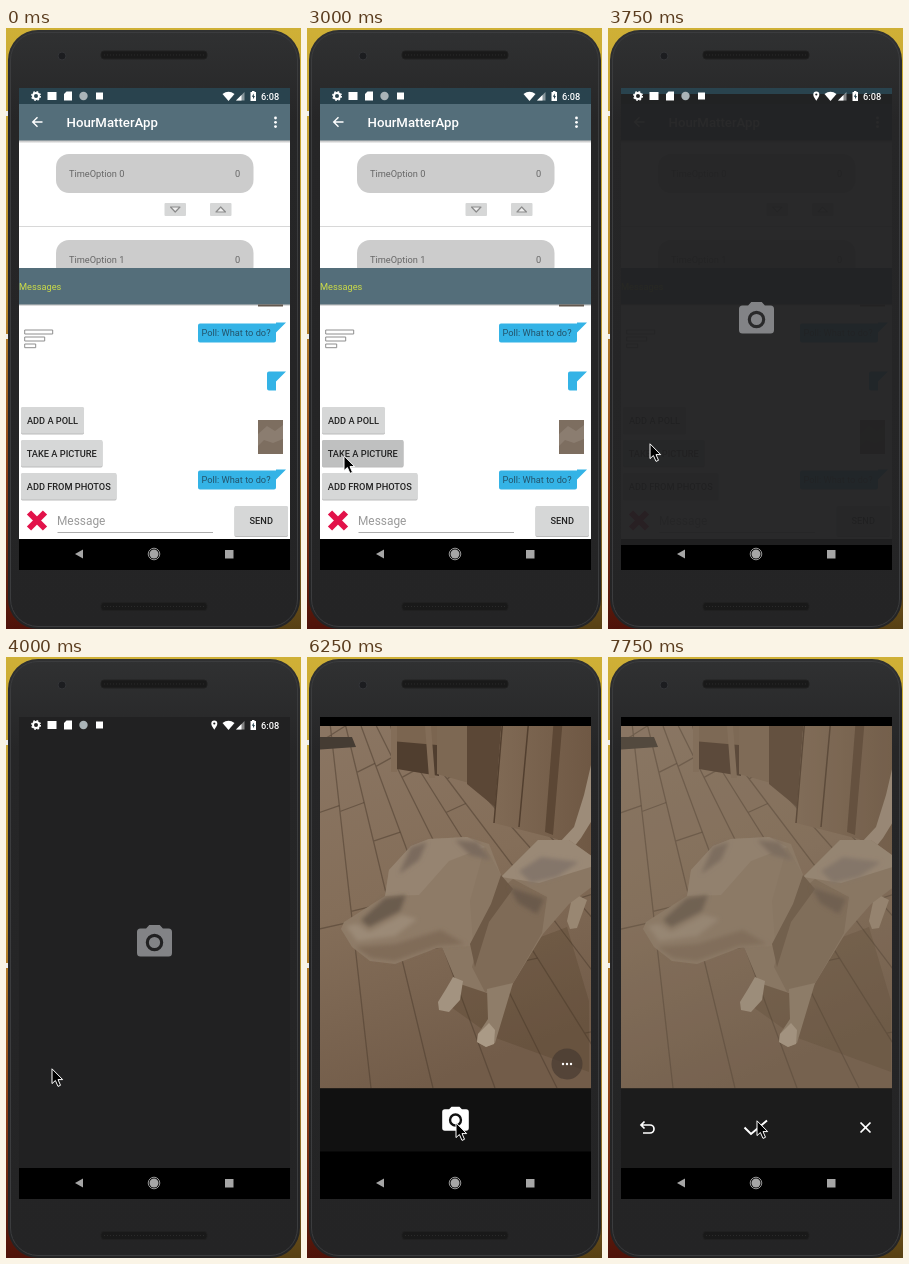
An HTML page that plays this animation: 295 by 601 pixels, repeating every 8 s.

```html
<!DOCTYPE html>
<html lang="en">
<head>
<meta charset="utf-8">
<title>Phone messages</title>
<style>
html, body { margin: 0; width: 100%; height: 100%; overflow: hidden; background: #c9a92f; }
svg { display: block; width: 295px; height: 601px; }
text { font: 9.24px Roboto, "Open Sans", sans-serif; fill: #666; }
.med { font-weight: 500; fill: #222; }
.poll { fill: #23536a; }
</style>
</head>
<body>
<svg viewBox="0 0 295 601">
<defs>
  <linearGradient id="desk" x2="0" y2="1">
    <stop offset="0" stop-color="#cfb036"/><stop offset=".45" stop-color="#b98a2c"/>
    <stop offset=".75" stop-color="#8a3c16"/><stop offset="1" stop-color="#4e1209"/>
  </linearGradient>
  <linearGradient id="deskRight" x2="0" y2="1">
    <stop offset="0" stop-color="#cfb036"/><stop offset=".7" stop-color="#b08a30"/><stop offset="1" stop-color="#574014"/>
  </linearGradient>
  <linearGradient id="body" x2="0" y2="1">
    <stop offset="0" stop-color="#303132"/><stop offset=".15" stop-color="#262627"/><stop offset="1" stop-color="#242425"/>
  </linearGradient>
  <linearGradient id="floor" x2=".3" y2="1">
    <stop offset="0" stop-color="#8b7663"/><stop offset=".5" stop-color="#846e59"/><stop offset="1" stop-color="#725c49"/>
  </linearGradient>
  <linearGradient id="door">
    <stop offset="0" stop-color="#806a55"/><stop offset="1" stop-color="#6d5642"/>
  </linearGradient>
  <linearGradient id="shade" x2="0" y2="1">
    <stop offset="0" stop-color="#000" stop-opacity=".28"/><stop offset="1" stop-color="#000" stop-opacity="0"/>
  </linearGradient>
  <filter id="soft"><feGaussianBlur stdDeviation=".7"/></filter>
  <filter id="softer"><feGaussianBlur stdDeviation="2.2"/></filter>
  <clipPath id="screen"><rect x="13" y="60" width="271" height="482"/></clipPath>
  <clipPath id="list"><rect x="13" y="112" width="271" height="128"/></clipPath>
  <clipPath id="frame"><rect x="13" y="69" width="271" height="362.500"/></clipPath>
  <path id="bubble" d="M2 1H78V0H88L78 10V18q0 2-2 2H2q-2 0-2-2V3q0-2 2-2z" fill="#34b3e6"/>
  <path id="cam" fill-rule="evenodd" d="M-3-10L-4.800-8H-8q-2 0-2 2V6q0 2 2 2H8q2 0 2-2V-6q0-2-2-2H4.800L3-10zM0-5a5 5 0 0 1 0 10a5 5 0 0 1 0-10zM0-3.200a3.200 3.200 0 0 0 0 6.400a3.200 3.200 0 0 0 0-6.400z"/>
</defs>

<rect width="295" height="601" fill="url(#desk)"/>
<rect x="150" width="145" height="601" fill="url(#deskRight)"/>
<path d="M0 83h2v5h-2zM0 306h2v5h-2z" fill="#eee"/>
<rect x="2" y="2" width="292" height="599" rx="30" fill="url(#body)"/>
<rect x="4.500" y="4.500" width="287" height="594" rx="27.500" fill="none" stroke="#3b3c3e"/>
<circle cx="56" cy="28" r="4" fill="#1c1d20" stroke="#333437"/>
<g fill="#191919" stroke="#202020">
  <rect x="95" y="23" width="106" height="8" rx="3"/>
  <rect x="95" y="574.500" width="106" height="8" rx="3"/>
</g>
<g stroke="#2b2b2b" stroke-dasharray="1 2"><path d="M98 27H199M98 578.500H199"/></g>

<g clip-path="url(#screen)">
  <rect x="13" y="60" width="271" height="482"/>

  <g id="chat">
    <rect x="13" y="60" width="271" height="451" fill="#fff"/>
    <rect x="13" y="60" width="271" height="16" fill="#29434e"/>
    <rect x="13" y="76" width="271" height="36.500" fill="#546e7a"/>
    <rect x="13" y="112.500" width="271" height="3" fill="url(#shade)"/>
    <path d="M36.500 94H27M31.500 89.200L26.700 94L31.500 98.800" fill="none" stroke="#fff" stroke-width="1.400"/>
    <text x="60.500" y="99" class="med" style="font-size:13.2px;fill:#fff">HourMatterApp</text>
    <g fill="#fff"><circle cx="269.500" cy="90" r="1.400"/><circle cx="269.500" cy="94.300" r="1.400"/><circle cx="269.500" cy="98.600" r="1.400"/></g>

    <g clip-path="url(#list)">
      <g fill="#ccc"><rect x="50" y="126" width="197.500" height="39" rx="13"/><rect x="50" y="212" width="197.500" height="39" rx="13"/></g>
      <text x="63" y="149">TimeOption 0</text><text x="229" y="149">0</text>
      <text x="63" y="235">TimeOption 1</text><text x="229" y="235">0</text>
      <path d="M13 198.500H284" stroke="#d8d8d8"/>
      <g fill="#d6d7d7"><rect x="158.500" y="175" width="21.500" height="13" rx="1"/><rect x="204" y="175" width="21.500" height="13" rx="1"/></g>
      <path d="M164.500 179H174L169.200 184zM210 184H219.500L214.700 179z" fill="#eee" stroke="#8b8b8b" stroke-width="1.200" stroke-linejoin="round"/>
    </g>

    <rect x="13" y="240" width="271" height="36.500" fill="#546e7a"/>
    <rect x="13" y="276.500" width="271" height="2" fill="url(#shade)"/>
    <text x="13" y="262" style="fill:#cbdb48">Messages</text>
    <rect x="252" y="276.500" width="25" height="2" fill="#62584f"/>
    <path d="M18.700 302h28v4h-28zM18.700 309h20v4h-20zM18.700 316h11v3.700h-11z" fill="#fff" stroke="#8e8e8e"/>

    <use href="#bubble" x="192" y="294.500"/><text x="195.500" y="308" class="poll">Poll: What to do?</text>
    <path d="M262 343.500H280L270 353.500V362.500H263q-2 0-2-2V345.500q0-2 2-2z" fill="#34b3e6"/>
    <rect x="252" y="392" width="25" height="34" fill="#7d6e60"/>
    <path d="M252 406l9-8l8 5l8-6v14l-10 4l-9-3l-6 6z" fill="#8b7d70"/>
    <use href="#bubble" x="192" y="441.500"/><text x="195.500" y="455" class="poll">Poll: What to do?</text>

    <g id="buttons"></g>
    <path d="M23 484.500L39 500.500M39 484.500L23 500.500" stroke="#e2124a" stroke-width="6"/>
    <text x="51" y="497" style="font-size:11.88px;fill:#999">Message</text>
    <path d="M51.500 504.500H207" stroke="#999" stroke-width=".8"/>
  </g>

  <g id="splash">
    <rect id="veil" x="13" y="60" width="271" height="451" fill="#212122"/>
    <use href="#cam" transform="translate(148.500 285.500) scale(1.75)" fill="#828386"/>
  </g>

  <g id="camera">
    <rect x="13" y="60" width="271" height="451"/>
    <g clip-path="url(#frame)"><g id="photo">
      <rect x="5" y="60" width="290" height="380" fill="url(#floor)"/>
      <g filter="url(#soft)">
        <g id="planks" fill="none" stroke="#4b3b2d" stroke-opacity=".5" stroke-width="1.300"></g>
        <path d="M5 80L45 80L49 90L5 93z" fill="#453c33"/>
        <path d="M82 60H132V119L90 112z" fill="#503e2f"/>
        <path d="M84 60H130V88L84 84z" fill="#7b6550"/>
        <path d="M84 69h6v46h-6zM118 69h6l4 52h-6z" fill="#836d58"/>
        <path d="M130 60H162V126L130 117z" fill="#7d6853"/>
        <path d="M160 60H195L188 150L160 127z" fill="#5b4736"/>
        <path d="M195 60H295V215L250 182L187 166z" fill="url(#door)"/>
        <path d="M196 60L187 166M222 60L212 170" stroke="#523f2f" stroke-width="1.500" fill="none"/>
        <path d="M247 60h9l-10 118-8-3z" fill="#5c4735"/>
        <path d="M137 345L186 380L282 415V344L260 270L180 300z" fill="#46321f" opacity=".22"/>
      </g>
      <g id="dog" filter="url(#soft)"></g>
      <g id="marks" filter="url(#softer)"></g>
    </g></g>
    <rect id="wash" x="13" y="69" width="271" height="362.500" fill="#857567" opacity=".22"/>
    <g id="more">
      <circle cx="260" cy="407" r="15.500" fill="#43372f" opacity=".65"/>
      <g fill="#fff"><circle cx="256" cy="407" r="1.200"/><circle cx="260" cy="407" r="1.200"/><circle cx="264" cy="407" r="1.200"/></g>
    </g>
    <rect id="bar" x="13" y="431.500" width="271" height="63" fill="#111"/>
    <use id="shutter" href="#cam" transform="translate(148.500 463) scale(1.33)" fill="#fff"/>
    <g id="review" fill="none" stroke="#fff" stroke-width="1.700">
      <path d="M36.500 464.500L33 468L36.500 471.500M33 468H42a4 4 0 0 1 0 8H35"/>
      <path d="M136.500 470.500L143 477L159 463.500" stroke-width="2"/>
      <path d="M252.500 465.500L262.500 475.500M262.500 465.500L252.500 475.500"/>
    </g>
  </g>

  <g id="status" fill="#fff">
    <circle cx="30" cy="68" r="3" fill="none" stroke="#fff" stroke-width="2"/>
    <circle cx="30" cy="68" r="4.300" fill="none" stroke="#fff" stroke-width="1.400" stroke-dasharray="1.700 1.680"/>
    <rect x="41.500" y="64" width="9" height="8"/>
    <path d="M60.500 63.500H66V72.500H58V66z"/>
    <circle cx="77.500" cy="68" r="4.200" fill="#aab4b8"/>
    <rect x="90" y="64.500" width="7" height="7"/>
    <path id="pin" d="M208.300 72.700C206 69.500 205.300 68.200 205.300 66.500a3 3 0 0 1 6 0C211.300 68.200 210.600 69.500 208.300 72.700zM208.300 65.400a1.100 1.100 0 0 0 0 2.200a1.100 1.100 0 0 0 0-2.200z"/>
    <path d="M216.500 66Q222.500 61.500 228.500 66L222.500 73z"/>
    <path d="M230 72.500L238.500 64V72.500z" opacity=".45"/><path d="M230 72.500L235.500 67V72.500z"/>
    <path d="M246 63h2.500v1h1.500v9h-5.500v-9h1.500z"/><path d="M247.800 65.500l-2 3.200h1.200v2.600l2-3.300h-1.200z" fill="#29434e"/>
    <text x="255" y="71.500" class="med" style="fill:#fff">6:08</text>
  </g>

  <g fill="#a6a6a6">
    <path d="M69 526L77 521.500V530.500z"/>
    <circle cx="148" cy="526" r="4.500"/><circle cx="148" cy="526" r="5.800" fill="none" stroke="#a6a6a6" stroke-width=".9"/>
    <rect x="219" y="522" width="8.500" height="8.500"/>
  </g>
</g>
<path id="cursor" d="M0 .8V15.600L3.400 12.500L6 18.400L8.500 17.300L6 11.600H10.700z" fill="#000" stroke="#fff" stroke-width="1"/>
</svg>

<script>
const LOOP = 8000;
const $ = id => document.getElementById(id);
const add = (parent, tag, attrs, text = '') => {
  const el = document.createElementNS('http://www.w3.org/2000/svg', tag);
  for (const k in attrs) el.setAttribute(k, attrs[k]);
  el.textContent = text;
  parent.append(el);
  return el;
};

const button = (x, y, w, h, label) => {
  add($('buttons'), 'rect', { x, y: y + 1, width: w, height: h, rx: 1.4, fill: '#bbb' });
  const face = add($('buttons'), 'rect', { x, y, width: w, height: h, rx: 1.4, fill: '#d6d7d7' });
  add($('buttons'), 'text', { x: x + w / 2, y: y + h / 2 + 3.3, class: 'med', 'text-anchor': 'middle' }, label);
  return face;
};
button(15, 379, 63, 26.5, 'ADD A POLL');
const take = button(15, 412, 81.5, 26.5, 'TAKE A PICTURE');
button(15, 445, 95.5, 26.5, 'ADD FROM PHOTOS');
button(228.5, 478, 53.5, 30, 'SEND');

// Floorboards fan out from one vanishing point
let seed = 7;
const rand = () => (seed = seed * 16807 % 2147483647) / 2147483647;
const seam = (i, y) => 10 + (i * 62 - 70) * (y + 50) / 481;
for (let i = -2; i < 13; i++) {
  let d = `M${seam(i, 69)} 69L${seam(i, 431)} 431`;
  for (let y = 75 + rand() * 50; y < 431; y += 40 + y * (.2 + .4 * rand()))
    d += `M${seam(i, y)} ${y}L${seam(i + 1, y - 9)} ${y - 9}`;
  add($('planks'), 'path', { d });
}

const facets = [
  ['#9d8c79', 'M252 186L267 170L277 138L284 108L290 100V155L274 181L262 196z'],
  ['#998772', 'M266 236L260 264L263 272L270 271L280 243z'],
  ['#8a7763', 'M194 220L231 183L262 183L290 203V226L262 247L236 277L205 328L180 336L150 326L134 288z'],
  ['#9a8976', 'M194 220L231 183L262 183L290 203V208L232 226z'],
  ['#7f6b57', 'M184 240L206 222L240 240L235 276L205 328L178 335L165 310z'],
  ['#8f7d69', 'M180 332L206 326L188 386L179 390L170 385L171 377L181 362z'],
  ['#aa9a86', 'M171 377L182 366L188 373L187 387L179 390L170 385z'],
  ['#a39380', 'M146 320L156 324L153 343L142 355L132 353L131 345L139 332z'],
  ['#8e7b67', 'M34 272L37 265L78 239L82 213L104 189L122 182L160 180L182 187L194 218L185 250L165 289L130 291L88 307L63 304L45 290z'],
  ['#968471', 'M82 213L104 189L122 182L160 180L178 190L142 204L112 238L78 239z'],
  ['#8a7763', 'M178 190L194 218L187 246L166 285L163 244z'],
  ['#6d5946', 'M194 218L206 232L182 265L168 310L163 287L184 247z']
];
const marks = [
  ['#7a6b5d', 'M104 190L120 185L112 203L92 217zM148 183L170 185L184 203L163 198z'],
  ['#6b5c4e', 'M54 263L78 241L99 238L93 254L62 270z'],
  ['#9b8a77', 'M39 269L50 267L62 275L95 258L110 262L88 279L50 284z'],
  ['#806c59', 'M48 290L88 287L134 273L158 287L130 289L88 304L64 301z'],
  ['#84766a', 'M212 214L234 200L272 205L250 220L224 226z'],
  ['#6b5a4c', 'M202 230L237 242L230 257L211 246z']
];
for (const [fill, d] of facets) add($('dog'), 'path', { fill, d });
for (const [fill, d] of marks) add($('marks'), 'path', { fill, d });

// time, x, y of the pointer tip
const pointer = [
  [0, 320, 352], [1000, 294, 352], [1250, 112, 458], [1500, 38, 434], [1750, 36, 422],
  [2750, 35, 427], [3000, 37, 427], [3250, 38, 427], [3500, 39, 422], [3750, 42, 415],
  [4000, 46, 411], [4250, 48, 409], [4500, 148, 386], [4750, 150, 480], [5000, 142, 461],
  [5750, 143, 462], [6000, 152, 465], [6250, 149, 465], [6750, 148, 460], [7000, 143, 452],
  [7250, 149, 459], [7500, 149, 463]
];
// time, veil opacity, downward offset
const fade = [[0, 0, 12], [3250, .8, 12], [3500, .9, 9], [3750, .96, 6], [4000, 1, 0]];
// time, bar colour, bar height, shutter opacity, review opacity
const bars = [
  [0, '#111', 63, 1, 0], [6500, '#171717', 63, .45, 0], [6750, '#171717', 63, 0, .5],
  [7000, '#1c1c1c', 63, 0, 1], [7500, '#1c1c1c', 79.5, 0, 1]
];
const at = (steps, t) => steps.findLast(s => s[0] <= t);
const show = (id, on) => $(id).style.display = on ? '' : 'none';
const set = (id, key, value) => $(id).setAttribute(key, value);

function draw(t) {
  const [, x, y] = at(pointer, t);
  set('cursor', 'transform', `translate(${x} ${y})`);
  take.setAttribute('fill', t >= 3000 ? '#bfc0c0' : '#d6d7d7');

  const [, veil, dy] = at(fade, t);
  show('splash', veil > 0 && t < 4250);
  set('splash', 'transform', `translate(0 ${dy})`);
  set('veil', 'opacity', veil);
  show('pin', t >= 3250);
  show('chat', t < 4000);
  show('status', t < 4250);

  show('camera', t >= 4250);
  const [, colour, height, shutter, review] = at(bars, t);
  set('bar', 'fill', colour);
  set('bar', 'height', height);
  set('shutter', 'opacity', shutter);
  set('review', 'opacity', review);
  show('more', t < 7500);
  show('wash', t >= 7500);
  set('photo', 'transform', `translate(${t >= 7500 ? 1 : 0} 0)`);
}

const start = performance.now();
function tick(now) {
  draw(Math.max(0, now - start) % LOOP);
  requestAnimationFrame(tick);
}
draw(0);
requestAnimationFrame(tick);
</script>
</body>
</html>
```
